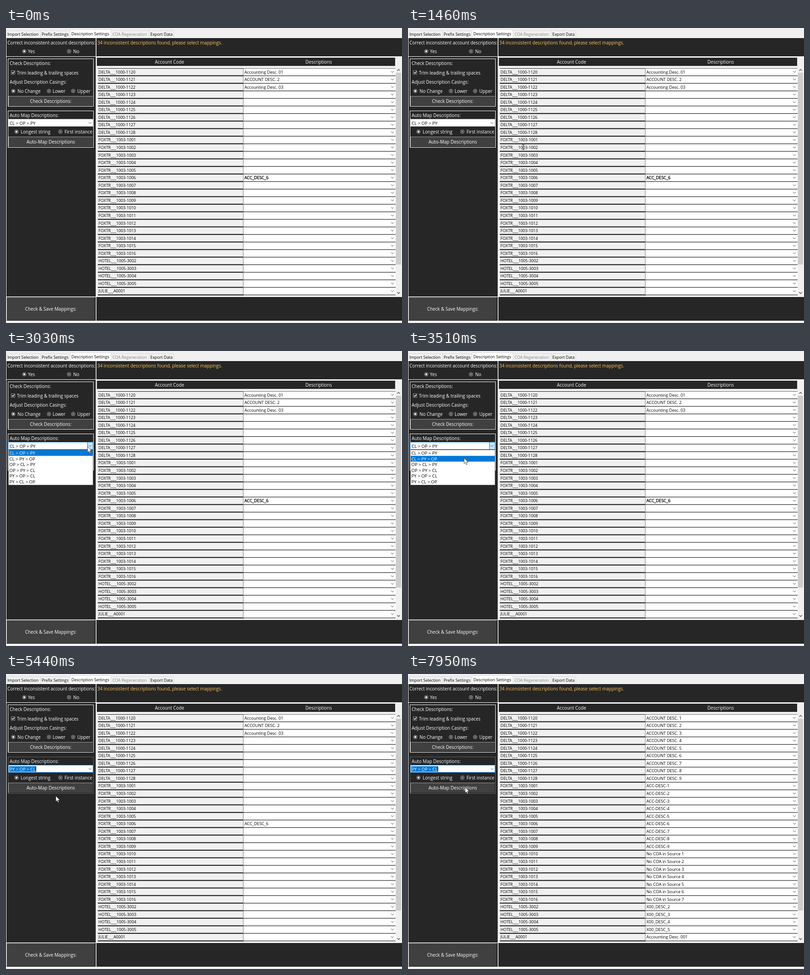
Recreate the animation shown at these times as an HTML page. Size 867x646 px, loop 8 s.

```html
<!DOCTYPE html>
<html lang="en">
<head>
<meta charset="utf-8">
<title>Description Settings</title>
<style>
  html, body { margin: 0; width: 100%; height: 100%; overflow: hidden; background: #f0f0f0; }
  svg { display: block; width: 867px; height: 646px; }
  text { font-family: "Open Sans", "Noto Sans", sans-serif; white-space: pre; }
</style>
</head>
<body>
<svg id="stage" viewBox="0 0 867 646" xmlns="http://www.w3.org/2000/svg"></svg>
<script>
const NS = 'http://www.w3.org/2000/svg';
const stage = document.getElementById('stage');
const DARK = '#262626', FACE = '#f0f0f0', BLUE = '#0078d7', BTN = '#404040';
const LIGHT = '#9f9f9f', SHADE = '#1c1c1c';
const LOOP = 8000, ROWS = 30, PITCH = 16.55;

function add(tag, attrs, parent = stage) {
  const el = document.createElementNS(NS, tag);
  for (const k in attrs) el.setAttribute(k, attrs[k]);
  parent.appendChild(el);
  return el;
}
const group = (parent = stage) => add('g', {}, parent);
// filled box from corner to corner
const box = (x1, y1, x2, y2, fill, parent) =>
  add('rect', { x: x1, y: y1, width: x2 - x1, height: y2 - y1, fill }, parent);
// one pixel outline inside the corners
const frame = (x1, y1, x2, y2, stroke, fill = 'none', parent) =>
  add('rect', { x: x1 + .5, y: y1 + .5, width: x2 - x1 - 1, height: y2 - y1 - 1, fill, stroke }, parent);
const path = (d, stroke, width = 1, parent) =>
  add('path', { d, stroke, 'stroke-width': width, fill: 'none' }, parent);
// y is the middle of the line
function text(str, x, y, size, fill, parent, anchor = 'start') {
  const el = add('text', { x, y: y + 3.5, 'font-size': size, fill, 'text-anchor': anchor }, parent);
  el.textContent = str;
  return el;
}
const label = (str, x, y, fill = '#fff') => text(str, x, y, 9.88, fill);
const title = (str, x, y) => text(str, x, y, 9.95, '#fff', stage, 'middle');
const chevron = (x, y, parent, color = '#444') =>
  path(`M${x - 3} ${y - 1.5}l3 3l3 -3`, color, 1, parent);
const show = (el, on) => el.setAttribute('visibility', on ? 'visible' : 'hidden');

function button(x1, y1, x2, y2, str) {
  box(x1, y1, x2, y2, BTN);
  const light = path(`M${x1 + .5} ${y2 - .5}V${y1 + .5}H${x2 - .5}`, LIGHT);
  const shade = path(`M${x1 + .5} ${y2 - .5}H${x2 - .5}V${y1 + .5}`, SHADE);
  const caption = title(str, (x1 + x2) / 2, (y1 + y2) / 2);
  return on => {
    light.setAttribute('stroke', on ? SHADE : LIGHT);
    shade.setAttribute('stroke', on ? LIGHT : SHADE);
    caption.setAttribute('transform', on ? 'translate(1 1)' : '');
  };
}

function radio(x, y, on, str, tx) {
  add('circle', { cx: x, cy: y, r: 4, fill: DARK, stroke: '#a8a8a8' });
  add('circle', { cx: x, cy: y, r: 2.2, fill: on ? '#fff' : '#858585' });
  label(str, tx, y);
}

// ---- tabs
box(0, 0, 867, 646, FACE);
function tab(x1, x2, str, tx, fill = '#000') {
  frame(x1, 5, x2, 22, '#d9d9d9', FACE);
  text(str, tx, 13, 8.9, fill);
}
tab(0, 76, 'Import Selection', 3);
tab(75, 141, 'Prefix Settings', 78);
tab(229, 314, 'COA Regeneration', 233, '#838383');
tab(313, 368, 'Export Data', 316);
frame(140, 3, 230, 23, '#d9d9d9', '#fff');
text('Description Settings', 143, 12, 8.92, '#000');

// ---- panels
box(0, 21, 867, 643, '#fff');
box(1, 22, 196.5, 62, DARK);
box(198, 22, 867, 62, DARK);
box(1, 63, 196.5, 588, DARK);
box(1, 589, 196.5, 641, DARK);
box(198, 589, 867, 641, DARK);
box(198, 63, 867, 588, FACE);
box(0, 643, 867, 646, FACE);

label('Correct inconsistent account descriptions:', 3, 32);
radio(40, 51, true, 'Yes', 48);
radio(138, 51, false, 'No', 147);
label('34 inconsistent descriptions found, please select mappings.', 200, 32, '#ffc75f');

frame(4, 67, 192, 172, '#fff');
label('Check Descriptions:', 8, 77);
frame(11, 93, 20, 102, '#8c8c8c', DARK);
path('M13 97.3l2 2.2l3.5 -4.3', '#fff', 1.4);
label('Trim leading & trailing spaces', 24, 98);
label('Adjust Description Casings:', 8, 118);
radio(16, 138, true, 'No Change', 25);
radio(94, 138, false, 'Lower', 102);
radio(147, 138, false, 'Upper', 156);
button(5, 149, 191, 171, 'Check Descriptions:');

const mapFrame = frame(4, 181, 192, 262, '#fff');
label('Auto Map Descriptions:', 8, 191);
const comboEdge = frame(5, 199, 191, 216, '#a0a0a0', '#fff');
const comboMark = box(7, 202, 65, 214, BLUE);
const comboText = text('', 8, 208, 9.6, '#000');
const caret = box(65, 202, 66, 214, '#000');
const comboHot = frame(178, 199, 191, 216, BLUE, '#cce4f7');
chevron(184, 208);
radio(23, 227, true, 'Longest string', 32);
radio(119, 227, false, 'First instance', 128);
const pressMap = button(5, 238, 191, 261, 'Auto-Map Descriptions');
button(1, 589, 195, 641, 'Check & Save Mappings:');

// ---- table
box(199, 65, 852, 83, DARK);
title('Account Code', 358, 74);
title('Descriptions', 684.5, 74);
box(201, 88, 853, 587, DARK);

const clip = add('clipPath', { id: 'table' });
box(199, 83, 853, 587, '#000', clip);
const table = add('g', { 'clip-path': 'url(#table)' });
const cells = group(table), before = group(table), after = group(table);

function code(i) {
  if (i < 9) return 'DELTA___1000-' + (1120 + i);
  if (i < 25) return 'FOXTR___1003-' + (992 + i);
  if (i < 29) return 'HOTEL___1005-' + (2977 + i);
  return 'JULIE___A0001';
}
function mapped(i) {
  if (i < 9) return 'ACCOUNT DESC. ' + (i + 1);
  if (i < 18) return 'ACC-DESC-' + (i - 8);
  if (i < 25) return 'No COA in Source ' + (i - 17);
  if (i < 29) return 'X00_DESC_' + (i - 23);
  return 'Accounting Desc. 001';
}
const given = { 0: 'Accounting Desc. 01', 1: 'ACCOUNT DESC. 2', 2: 'Accounting Desc. 03', 14: 'ACC_DESC_6' };
let heavy;

for (let i = 0; i <= ROWS; i++) {
  const y = 96 + i * PITCH;
  box(201, y - 6.9, 519, y + 7.4, FACE, cells);
  box(519, y - 7.3, 853, y + 8, '#fff', cells);
  box(519, y - 7.3, 520, y + 8, '#7a7a7a', cells);
  if (i === ROWS) break;
  text(code(i), 202.5, y, 8.85, '#000', cells);
  chevron(846, y, cells);
  text(mapped(i), 522, y, 9.1, '#000', after);
  if (given[i]) {
    const el = text(given[i], 522, y, 9.1, '#000', before);
    if (i === 14) heavy = el;
  }
}
heavy.setAttribute('stroke', '#000');

// ---- scrollbar
box(853, 85, 867, 588, FACE);
box(853.5, 98, 865, 518, '#cdcdcd');
path('M856.5 93.5l3 -3l3 3', '#505050', 1.3);
path('M856.5 578.5l3 3l3 -3', '#505050', 1.3);

// ---- drop-down list
const list = group();
const LIST_TOP = 217, LIST_STEP = 12.6;
frame(5, 216, 191, 294, '#646464', '#fff', list);
const options = ['CL > OP > PY', 'CL > PY > OP', 'OP > CL > PY', 'OP > PY > CL', 'PY > OP > CL', 'PY > CL > OP'];
const pick = box(6, 0, 190, LIST_STEP, BLUE, list);
const items = options.map((s, i) => text(s, 7.5, LIST_TOP + 6.4 + i * LIST_STEP, 9.6, '#000', list));

// ---- pointer
const halo = add('circle', { r: 10, fill: '#ffe600', 'fill-opacity': .65 });
const arrow = add('path', {
  d: 'M0 0V12.6L2.9 9.9L5 14.6L7 13.7L5 9.2H9Z',
  fill: '#fff', stroke: '#111', 'stroke-width': .7
});
const beam = path('M-2.6 -5.5H-.8L0 -5L.8 -5.5H2.6M0 -5V5M-2.6 5.5H-.8L0 5L.8 5.5H2.6', '#222', 1);

const easeOut = u => 1 - (1 - u) ** 2;
const smooth = u => u * u * (3 - 2 * u);
const linear = u => u;
// start, end, destination, easing
const moves = [
  [340, 1140, 342, 340, easeOut],
  [1160, 1700, 189, 205, smooth],
  [2870, 3510, 123, 234, smooth],
  [3510, 3700, 110, 258, easeOut],
  [3720, 3910, 108, 273, easeOut],
  [5200, 5440, 109, 267, linear],
  [5440, 5930, 113, 253, smooth],
  [7810, 7950, 125, 248, easeOut]
];

function pointer(t) {
  let x = 844, y = 630;
  for (const [a, b, nx, ny, ease] of moves) {
    if (t < a) break;
    const u = ease(Math.min(1, (t - a) / (b - a)));
    x += (nx - x) * u;
    y += (ny - y) * u;
  }
  return [x, y];
}

const within = (t, a, b) => t >= a && t < b;

function draw(t) {
  const [x, y] = pointer(t);
  const open = within(t, 2540, 4950), chosen = t >= 4950, filled = t >= 6520;
  const hot = within(t, 1660, 4950);
  const seen = t >= 370;
  const inTable = x > 200 && x < 853 && y > 88 && y < 587;

  show(arrow, seen && !inTable);
  show(beam, seen && inTable);
  const at = `translate(${x.toFixed(2)} ${y.toFixed(2)})`;
  for (const el of [arrow, beam, halo]) el.setAttribute('transform', at);
  show(halo, within(t, 2490, 2570) || within(t, 4820, 4950) || within(t, 6420, 6580));

  mapFrame.setAttribute('stroke', chosen ? '#646464' : '#fff');
  comboEdge.setAttribute('stroke', hot || chosen ? BLUE : '#a0a0a0');
  show(comboHot, hot);
  show(comboMark, chosen);
  comboText.textContent = options[chosen ? 4 : 0];
  comboText.setAttribute('fill', chosen ? '#fff' : '#000');
  show(caret, chosen && (t - 4950) % 900 < 600);
  pressMap(within(t, 6420, 6520));

  show(list, open);
  const row = Math.max(0, Math.min(5, Math.floor((y - LIST_TOP) / LIST_STEP)));
  pick.setAttribute('y', LIST_TOP + row * LIST_STEP);
  items.forEach((el, i) => el.setAttribute('fill', i === row ? '#fff' : '#000'));

  show(before, !filled);
  show(after, filled);
  heavy.setAttribute('stroke-width', t < 4820 ? .35 : 0);
}

const begin = performance.now();
function tick() {
  draw((performance.now() - begin) % LOOP);
  requestAnimationFrame(tick);
}
draw(0);
requestAnimationFrame(tick);
</script>
</body>
</html>
```
